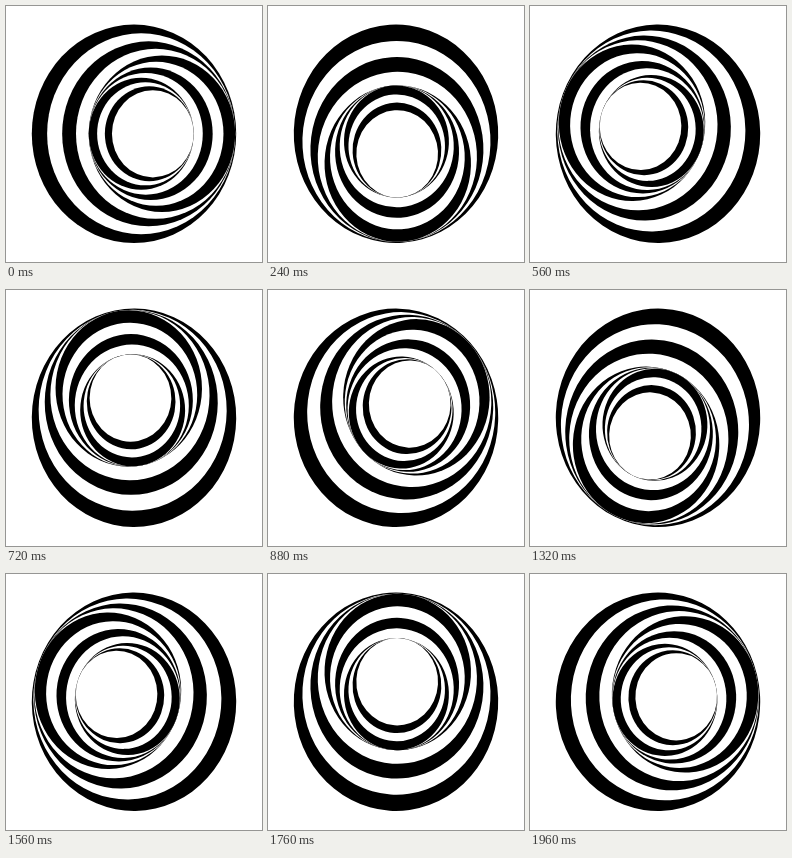
An HTML page that plays this animation: 256x256 px, repeating every 2 s.

```html
<!DOCTYPE html>
<html lang="en">
<head>
<meta charset="utf-8">
<title>Rotating nested circles</title>
<style>
html, body { margin: 0; width: 100%; height: 100%; overflow: hidden; background: #fff; }
svg { display: block; width: 100vw; height: 100vh; }
</style>
</head>
<body>
<svg viewBox="0 0 256 256"><g id="rings"></g></svg>
<script>
const COUNT = 12;       // nested circles, alternating black and white
const GROUP = 4;        // circles sharing one tangent point
const OUTER = 109.2;
const RIM = 1.1;        // black left between the outline and the first tangent point
const SHRINK = 0.92;
const TURN_MS = 1000;
const STEP_MS = 40;
const LOOP_MS = 2000;

const rings = document.getElementById('rings');

function addCircle(x, r, fill) {
  const circle = document.createElementNS('http://www.w3.org/2000/svg', 'circle');
  circle.setAttribute('cx', x);
  circle.setAttribute('r', r);
  circle.setAttribute('fill', fill);
  rings.append(circle);
}

function buildRings() {
  addCircle(0, OUTER, '#000');
  let x = -RIM;
  let r = OUTER;
  for (let i = 1; i < COUNT; i++) {
    // Successive groups touch on opposite sides.
    const side = Math.floor((i - 1) / GROUP) % 2 ? -1 : 1;
    const next = r * SHRINK;
    x += side * (r - next);
    r = next;
    addCircle(x, r, i % 2 ? '#fff' : '#000');
  }
}

function draw(ms) {
  const time = Math.floor((ms % LOOP_MS) / STEP_MS) * STEP_MS;
  const angle = time / TURN_MS * 360;
  rings.setAttribute('transform', `translate(128 127.8) scale(.936 1) rotate(${angle})`);
}

function tick() {
  draw(performance.now() - start);
  requestAnimationFrame(tick);
}

buildRings();
const start = performance.now();
tick();
</script>
</body>
</html>
```
